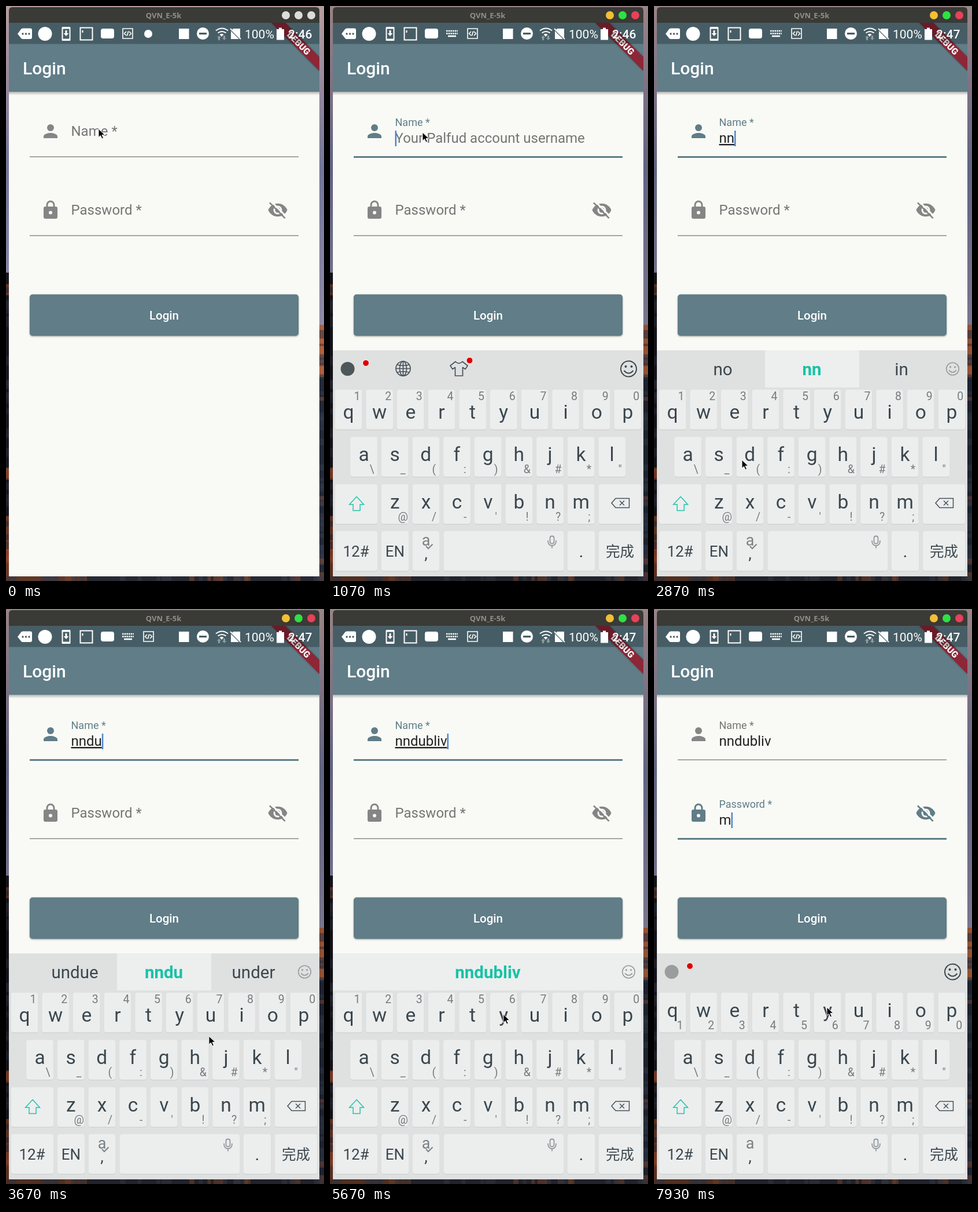
Animation of 550x992 px, one loop 8000 ms. Source, as an HTML page:

```html
<!DOCTYPE html>
<html lang="en">
<head>
<meta charset="utf-8">
<title>Login form</title>
<style>
html, body { margin: 0; width: 100%; height: 100%; overflow: hidden; background: #25252c; }
svg { display: block; width: 100vw; height: 100vh; font-family: Roboto, sans-serif; }
.mid { text-anchor: middle; }
.stroke { fill: none; stroke: currentColor; }
</style>
</head>
<body>
<svg id="stage" viewBox="0 0 550 992">
  <defs>
    <linearGradient id="sky" x2="0" y2="1">
      <stop offset="0" stop-color="#b79d9f"/><stop offset=".2" stop-color="#9c8c9d"/>
      <stop offset=".5" stop-color="#74769a"/><stop offset="1" stop-color="#918ca8"/>
    </linearGradient>
    <linearGradient id="fade" x2="0" y2="1">
      <stop offset="0" stop-opacity=".28"/><stop offset="1" stop-opacity="0"/>
    </linearGradient>
    <filter id="soft" x="-10%" y="-20%" width="120%" height="140%"><feGaussianBlur stdDeviation="1.500"/></filter>
    <clipPath id="screen"><path d="M5 29H542V984H5z"/></clipPath>
  </defs>
  <g id="wallpaper"><path fill="url(#sky)" d="M0 0H550V560H0z"/></g>
  <path id="edge" d="M0 0H550V992H0z" opacity="0"/>

  <path fill="#3a3a36" d="M5 29V8q0-6 6-6H536q6 0 6 6V29z"/>
  <text class="mid" x="272.5" y="21" font-family="Open Sans, sans-serif" font-size="13" font-weight="700" fill="#918f88">QVN_E-5k</text>
  <g id="buttons"><circle cx="484" cy="16" r="7"/><circle cx="506" cy="16" r="7"/><circle cx="528" cy="16" r="7"/></g>

  <g clip-path="url(#screen)">
    <path fill="#f9faf5" d="M5 29H542V984H5z"/>
    <path fill="url(#fade)" d="M5 148H542V154H5z"/>
    <path fill="#607d88" d="M5 29H542V148H5z"/>
    <text x="29" y="118" font-size="30" font-weight="500" fill="#fff">Login</text>

    <path d="M459 29H483L542 88V112z" opacity=".4" filter="url(#soft)"/>
    <path fill="#8d2636" d="M459 29H483L542 88V112z"/>
    <text class="mid" transform="translate(502.500 68) rotate(45)" font-size="15.500" font-weight="900" fill="#fff">DEBUG</text>
    <path d="M5 29H542V65.500H5z" opacity=".26"/>

    <g fill="#fff" color="#fff">
      <path d="M20 48l6-8q1-1.500 3-1.500H42q3 0 3 3V54q0 3-3 3H29q-2 0-3-1.500z"/>
      <g fill="#465c64"><circle cx="29" cy="48" r="1.700"/><circle cx="34.500" cy="48" r="1.700"/><circle cx="40" cy="48" r="1.700"/></g>
      <circle cx="67.500" cy="48" r="12"/>
      <path fill-rule="evenodd" d="M98 36H110q1.500 0 1.500 1.500V58.500q0 1.500-1.500 1.500H98q-1.500 0-1.500-1.500V37.500q0-1.500 1.500-1.500zM98.500 39.500V56.500H109.500V39.500z"/>
      <path d="M102.500 42h3v5h3l-4.500 5-4.500-5h3z"/>
      <path class="stroke" stroke-width="2" d="M128.500 37.500h21v21h-21zM132.500 42v4"/>
      <rect x="164" y="39" width="23" height="17" rx="4"/>
      <circle id="plug" cx="246" cy="48" r="7"/>
      <g id="kbIcon">
        <path class="stroke" stroke-width="2.600" stroke-dasharray="2.600 1.100" d="M201 43h20M201 47.500h20"/>
        <path class="stroke" stroke-width="2.600" d="M204 52h14"/>
      </g>
      <g id="codeIcon"><path class="stroke" stroke-width="1.600" d="M-8.500-8.500h17v17h-17zM-2.500-3.500L-6 0l3.500 3.500M2.500-3.500L6 0l-3.500 3.500M1.200-4L-1.200 4"/></g>
      <rect x="299" y="39" width="17.500" height="18"/>
      <circle cx="340.500" cy="47.500" r="10.500"/><path fill="#465c64" d="M334 46h13v3.200h-13z"/>
      <path class="stroke" stroke-width="2" d="M363 42.500q10.500-8 21 0M366.500 46.500q7-5 14 0"/>
      <path d="M369.500 49q4-2 7 0l-3.500 4z"/>
      <path fill="#8d9da3" d="M365 55l3.500-4 3.500 4h-2v4h-3v-4zM374 55h2v-4h3v4h2l-3.500 4z"/>
      <path d="M393 39H405V55L391 41zM389 43L403 57H389z"/>
      <path class="stroke" stroke-width="1.800" d="M388 39L406 57"/>
      <text x="413" y="55.500" font-size="21">100%</text>
      <path d="M468 40h4v-2.500h5V40h4v18.500h-13z"/>
      <text id="clock" x="488" y="55.500" font-size="21" font-weight="500"></text>
    </g>

    <g id="form"></g>
    <rect x="41" y="499" width="465" height="71" rx="5" opacity=".4" filter="url(#soft)"/>
    <rect x="41" y="497.500" width="465" height="71.500" rx="5" fill="#607d88"/>
    <text class="mid" x="273.500" y="541" font-size="20.500" font-weight="500" fill="#fff">Login</text>

    <g id="keyboard">
      <path fill="#dfe1e1" d="M5 594H542V984H5z"/>
      <g id="suggest">
        <path id="slot" fill="#ecefee"/>
        <g class="mid" font-size="29.500" fill="#3b474d">
          <text id="left" x="119" y="637"></text>
          <text id="best" x="273" y="637" font-weight="700" fill="#18c2a6"></text>
          <text id="right" x="428" y="637"></text>
        </g>
      </g>
      <g id="tools">
        <circle id="brand" cx="30.500" cy="626" r="12"/>
        <g id="extras" color="#465158">
          <g class="stroke" stroke-width="1.700"><circle cx="126.500" cy="625.500" r="12.500"/><ellipse cx="126.500" cy="625.500" rx="6" ry="12.500"/><path d="M114 625.500h25M126.500 613v25M116.500 619q10 3 20 0M116.500 632q10-3 20 0"/></g>
          <path class="stroke" stroke-width="1.700" stroke-linejoin="round" d="M217 613.500q6 6 12 0l9 7-4 6-4.500-3V638h-13v-14.500l-4.500 3-4-6z"/>
          <circle cx="241.500" cy="611.500" r="5.500" fill="#e00000" stroke="#fff"/>
        </g>
        <circle cx="62" cy="616" r="5.500" fill="#e00000" stroke="#fff"/>
      </g>
      <g id="smile"><circle class="stroke" r="13.500" stroke-width="2"/><circle cx="-5" cy="-4" r="2" fill="currentColor"/><circle cx="5" cy="-4" r="2" fill="currentColor"/><path class="stroke" stroke-width="2" d="M-8 3q8 9 16 0"/></g>
      <g id="keys"></g>
      <g fill="none" stroke-width="1.500">
        <path stroke="#20c3aa" d="M46 846.500L58.500 860H52v10.500H40V860h-6.500z"/>
        <path stroke="#465158" d="M487 857.500l7-8H517.500v16H494zM501 853.500l8 8m0-8l-8 8"/>
        <path stroke="#92989b" stroke-width="1.800" d="M384 914.500q3.500 0 3.500 3.500v6q0 3.500-3.500 3.500t-3.500-3.500v-6q0-3.500 3.500-3.500zM377 922q0 9 7 9t7-9M384 931v4.500"/>
        <path id="tick" stroke="#7b8285" stroke-width="2" d="M166 932l4 4 7.500-7.500"/>
      </g>
      <g class="mid" fill="#3b474d" font-size="26">
        <text x="45" y="950">12#</text><text x="112.500" y="950">EN</text>
        <text x="166" y="931" fill="#7b8285" font-size="27">a</text>
        <text x="166" y="954" font-size="28">,</text><text x="434.500" y="951" font-size="30">.</text>
        <text x="501.500" y="950" font-size="24.500" font-family="Noto Sans CJK SC, Noto Sans CJK, sans-serif">完成</text>
      </g>
      <g id="popup">
        <rect x="-37.500" y="-122.500" width="75" height="106" rx="3" opacity=".35" filter="url(#soft)"/>
        <rect x="-37.500" y="-124" width="75" height="105" rx="3" fill="#f2f2f2"/>
        <text id="popupLetter" class="mid" y="-50" font-size="54" fill="#535c60"></text>
        <text class="mid" x="25" y="-22" font-size="19" fill="#535c60">...</text>
      </g>
    </g>
  </g>
  <path id="pointer" d="M0 0V14.500L3.500 11.500 6 17 8.500 16 6 10.500H11z" stroke="#fff" stroke-width="1"/>
</svg>
<script>
const LOOP = 8000, FOCUS = 200, SWITCH = 6470, RELAYOUT = 6600;
const SLATE = '#607d88', GREY = '#858585';
const $ = id => document.getElementById(id);
const set = (el, attrs) => { for (const k in attrs) el.setAttribute(k, attrs[k]); };
const show = (el, on) => { el.style.display = on ? '' : 'none'; };
const write = (el, s) => { if (el.textContent !== s) el.textContent = s; };
const ramp = (t, from, ms) => Math.min(1, Math.max(0, (t - from) / ms));
const easeOut = p => 1 - (1 - p) ** 3;

// Release times of the tapped keys
const taps = [['n', 1900], ['n', 2420], ['d', 3010], ['u', 3520], ['b', 4180],
  ['l', 4650], ['i', 4980], ['v', 5470], ['m', 7480]];
const words = ['', 'no n in', 'no nn in', 'and nnd end', 'undue nndu under',
  'noble nndub Nobody', 'noble nndubl nimble', ' nndubli ', ' nndubliv '];
const track = [[0, 160, 212], [60, 160, 212], [150, 160, 218], [1330, 160, 218], [1750, 380, 848],
  [2520, 380, 848], [2870, 152, 783], [3060, 152, 783], [3400, 358, 700], [3560, 358, 700],
  [4000, 330, 846], [4220, 330, 846], [4520, 487, 775], [4670, 487, 775], [4880, 407, 702],
  [5010, 407, 702], [5320, 275, 850], [5500, 275, 850], [5670, 300, 700], [6100, 200, 356],
  [6520, 200, 356], [6930, 387, 836], [7200, 432, 850], [7560, 432, 850], [7930, 299, 687], [8000, 299, 680]];

// Soft blotches stand for the mountain photograph behind the window
let seed = 7;
const random = () => (seed = seed * 16807 % 2147483647) / 2147483647;
const box = (x, y, w, h, fill, opacity = 1) =>
  `<rect x="${x}" y="${y}" width="${w}" height="${h}" fill="${fill}" opacity="${opacity}"/>`;
let rocks = box(0, 460, 6, 532, '#17171e') + box(0, 880, 6, 112, '#6b3a28') + box(541, 550, 9, 90, '#b0603c') +
  box(541, 640, 9, 352, '#232938') + box(0, 983, 550, 9, '#272933') + box(0, 983, 140, 9, '#5f3828');
for (let i = 0; i < 30; i++) {
  rocks += box(0, 480 + random() * 500, 5, 6 + random() * 14, i % 4 ? '#2b2c38' : '#9a4a2c', .6);
  rocks += box(542, 550 + random() * 430, 8, 4 + random() * 12, i % 6 ? '#343b4e' : '#7d4a3c', .6);
  rocks += box(random() * 540, 984, 4 + random() * 14, 8, i % 4 ? '#383b48' : '#7a4632', .6);
}
$('wallpaper').innerHTML += rocks;

const icons = {
  person: '<circle cx="12" cy="8" r="4"/><path d="M12 14c-2.700 0-8 1.300-8 4v2h16v-2c0-2.700-5.300-4-8-4z"/>',
  lock: '<rect x="4" y="8" width="16" height="14" rx="2"/><path class="stroke" stroke-width="2" d="M8 9V6a4 4 0 0 1 8 0v3"/><circle cx="12" cy="15" r="2" fill="#f9faf5"/>',
  eye: '<path d="M1 12c1.700-4.400 6-7.500 11-7.500s9.300 3.100 11 7.500c-1.700 4.400-6 7.500-11 7.500S2.700 16.400 1 12z"/><circle cx="12" cy="12" r="5" fill="#f9faf5"/><circle cx="12" cy="12" r="3"/><path stroke="#f9faf5" stroke-width="2" d="M3.500 1.200L21.800 19.500"/><path stroke="currentColor" stroke-width="1.800" d="M2.600 3.600L20.400 21.400"/>'
};
const icon = (name, x, y) => `<g class="icon" fill="currentColor" transform="translate(${x} ${y}) scale(1.5)">${icons[name]}</g>`;

function makeField(label, hint, dy, art) {
  const g = document.createElementNS('http://www.w3.org/2000/svg', 'g');
  g.setAttribute('transform', `translate(0 ${dy})`);
  g.innerHTML = `${art}<text class="label" x="112.500">${label}</text>
    <text class="hint" x="112.500" y="236" font-size="24" fill="#757575">${hint}</text>
    <text class="value" x="112.500" y="236" font-size="24" fill="#212121"></text>
    <rect class="caret" y="215" width="2.500" height="27" fill="#4f84d4"/>
    <rect class="line" x="41" width="465"/>`;
  $('form').append(g);
  const part = name => g.querySelector('.' + name);
  return { icons: g.querySelectorAll('.icon'), label: part('label'), hint: part('hint'),
    value: part('value'), caret: part('caret'), line: part('line') };
}
const nameField = makeField('Name *', 'Your Palfud account username', 0, icon('person', 59, 198));
const passField = makeField('Password *', 'Your Palfud account ...', 136, icon('lock', 59, 198) + icon('eye', 452, 198));

function drawField(f, lift, focused, text, caretFrom, t) {
  const p = easeOut(lift);
  set(f.label, { y: 224 - 17 * p, 'font-size': 24 - 6 * p, fill: focused ? SLATE : '#757575' });
  f.icons.forEach(el => { el.style.color = focused ? SLATE : GREY; });
  set(f.line, focused ? { y: 259, height: 3, fill: SLATE } : { y: 259.5, height: 1.5, fill: '#8b8b88' });
  f.hint.style.opacity = text ? 0 : p * p;
  write(f.value, text);
  show(f.caret, focused && t >= caretFrom && (t - caretFrom) % 1000 < 500);
  set(f.caret, { x: 112.5 + (text ? f.value.getComputedTextLength() : 0) });
}

// Keys
const keys = {};
const cap = (x, y, w) => `<rect x="${x}" y="${y + 1.2}" width="${w}" height="68.500" rx="4" fill="#cdd0d1"/><rect class="cap" x="${x}" y="${y}" width="${w}" height="68.500" rx="4" fill="#eceeee"/>`;
const rows = [['qwertyuiop', '1234567890', 32, 662], ['asdfghjkl', '\\_(:)&#*"', 58.5, 743.5], ['zxcvbnm', "@/-'!?;", 112.3, 825]];
let markup = cap(9, 825, 73) + cap(465, 825, 73);
for (const [x, w] of [[9, 73], [89, 47], [143, 46], [197, 207], [411, 47], [465, 73]]) markup += cap(x, 906, w);
rows.forEach(([letters, extras, x0, top], row) => [...letters].forEach((ch, i) => {
  const x = x0 + 53.65 * i;
  keys[ch] = { x, top, row };
  markup += `<g id="key-${ch}" class="mid">${cap(x - 23.3, top, 46.6)}
    <text class="letter" x="${x}" y="${top + (row ? 41.5 : 50)}" font-size="33.500" fill="#3b474d">${ch}</text>
    <text class="extra" x="${x + 14}" y="${top + 62.5}" font-size="19.500" fill="#757b7e">${extras[i].replace('&', '&amp;')}</text></g>`;
}));
$('keys').innerHTML = markup;
for (const ch in keys) {
  const g = $('key-' + ch);
  Object.assign(keys[ch], { cap: g.querySelector('.cap'), letter: g.querySelector('.letter'), extra: g.querySelector('.extra') });
}

function drawKeyboard(t, typed) {
  const secret = t >= RELAYOUT, empty = secret || !typed;
  set($('keyboard'), { transform: `translate(0 ${400 * (1 - easeOut(ramp(t, 600, 220)))})` });
  const [left, best, right] = words[typed].split(' ');
  show($('suggest'), !empty);
  show($('tools'), empty);
  show($('extras'), !secret);
  show($('tick'), !secret);
  write($('left'), left);
  write($('best'), best || '');
  write($('right'), right || '');
  set($('slot'), { d: left ? 'M192 594H355V658H192z' : 'M5 594H542V658H5z' });
  set($('brand'), { fill: secret ? '#999d9e' : '#4d5659' });
  set($('smile'), { transform: `translate(516.5 626) scale(${empty ? 1 : .8})` });
  $('smile').style.color = empty ? '#3c474c' : '#989c9d';

  const tap = taps.find(([, end]) => t >= end - 100 && t < end);
  for (const ch in keys) {
    const k = keys[ch];
    set(k.cap, { fill: tap && tap[0] === ch ? '#9a9b9c' : '#eceeee' });
    if (k.row) continue;
    set(k.letter, { y: secret ? 704 : 712 });
    set(k.extra, { x: k.x + (secret ? 13 : 15), y: secret ? 725 : 680 });
  }
  show($('popup'), tap);
  if (tap) {
    const k = keys[tap[0]];
    set($('popup'), { transform: `translate(${k.x} ${k.top})` });
    write($('popupLetter'), tap[0]);
  }
}

function pointerAt(t) {
  const i = Math.max(1, track.findIndex(p => p[0] > t));
  const [t0, x0, y0] = track[i - 1], [t1, x1, y1] = track[i];
  const p = (t - t0) / (t1 - t0);
  return `translate(${x0 + (x1 - x0) * p} ${y0 + (y1 - y0) * p})`;
}

function draw(t) {
  const active = t >= 60, open = t >= 640;
  [...$('buttons').children].forEach((b, i) => set(b, { fill: active ? ['#f3bf33', '#2fe043', '#e8415a'][i] : '#dcdcda' }));
  set($('edge'), { opacity: active ? .16 : 0 });
  write($('clock'), t < 1600 ? '2:46' : '2:47');
  show($('kbIcon'), open);
  show($('plug'), !open);
  set($('codeIcon'), { transform: `translate(${open ? 246.5 : 210.5} 47.500)` });

  const done = taps.filter(([, end]) => t >= end);
  const typed = Math.min(8, done.length);
  const last = done.length ? done[done.length - 1][1] : 600;
  const inName = t >= FOCUS && t < SWITCH, inPass = t >= SWITCH;
  const word = done.slice(0, 8).map(d => d[0]).join('');
  drawField(nameField, ramp(t, FOCUS, 200), inName, word, last, t);
  nameField.value.style.textDecoration = inName ? 'underline 1.5px' : 'none';
  drawField(passField, ramp(t, SWITCH, 200), inPass, done.length > 8 ? 'm' : '', Math.max(last, SWITCH), t);
  drawKeyboard(t, typed);
  set($('pointer'), { transform: pointerAt(t) });
}

const start = performance.now();
function tick() {
  draw((performance.now() - start) % LOOP);
  requestAnimationFrame(tick);
}
tick();
</script>
</body>
</html>
```
